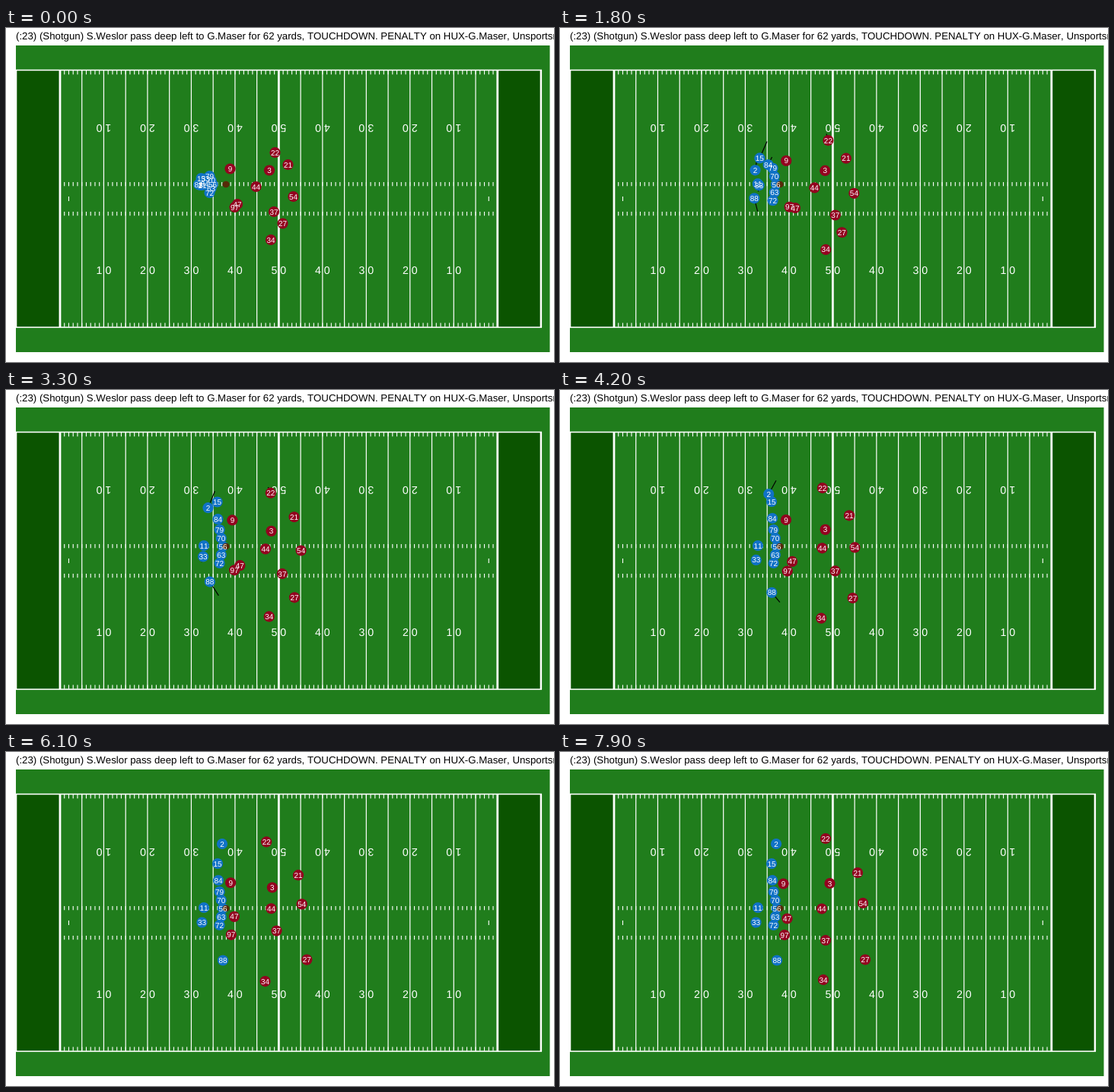
An HTML page that plays this animation: 720 px wide and 440 px high, repeating every 8 s.

```html
<!DOCTYPE html>
<html lang="en">
<head>
<meta charset="utf-8">
<title>Play tracking</title>
<style>
  html, body { margin: 0; width: 720px; height: 440px; overflow: hidden; background: #fff; }
  svg { display: block; }
  text {
    font-family: "Liberation Sans", Arial, sans-serif;
    font-kerning: none;
    text-rendering: geometricPrecision;
    white-space: pre;
  }
  .mid { fill: #fff; text-anchor: middle; }
</style>
</head>
<body>
<svg id="stage" width="720" height="440" viewBox="0 0 720 440"></svg>
<script>
const stage = document.getElementById("stage");
const GRASS = "#207d1c", ENDZONE = "#0b5400", BLUE = "#1072c6", RED = "#93001f";
const TOP = 55.5, BOTTOM = 394.3, YARD = 5.748;
const STEP = 100, STEPS = 80;
const BALL = { x: 289, y: 206 };

function add(parent, tag, attrs, text) {
  const el = document.createElementNS("http://www.w3.org/2000/svg", tag);
  set(el, attrs);
  if (text !== undefined) el.textContent = text;
  return parent.appendChild(el);
}

function set(el, attrs) {
  for (const name in attrs) el.setAttribute(name, attrs[name]);
}

const yardX = yard => 13.5 + YARD * yard;

function vertical(x, y1, y2, width) {
  add(stage, "line", { x1: x, x2: x, y1, y2, stroke: "#fff", "stroke-width": width });
}

function drawField() {
  add(stage, "rect", { x: 13, y: 23, width: 701.5, height: 404, fill: GRASS });
  for (const yard of [0, 110]) {
    add(stage, "rect", {
      x: yardX(yard), y: TOP, width: 10 * YARD, height: BOTTOM - TOP, fill: ENDZONE
    });
  }
  for (let yard = 15; yard < 110; yard += 5) vertical(yardX(yard), TOP, BOTTOM, 1.2);
  for (const yard of [10, 60, 110]) vertical(yardX(yard), TOP, BOTTOM, 2.8);
  for (let yard = 11; yard < 110; yard++) {
    for (const y of [56, 203, 242, 388.5]) vertical(yardX(yard), y, y + 5.3, 1.1);
  }
  for (const yard of [12, 108]) vertical(yardX(yard), 222, 228, 1.1);
  add(stage, "rect", {
    x: 13.5, y: TOP, width: 120 * YARD, height: BOTTOM - TOP,
    fill: "none", stroke: "#fff", "stroke-width": 1.6
  });
  vertical(yardX(120) - 0.4, TOP, BOTTOM, 2.4);
  for (let yard = 20; yard <= 100; yard += 10) {
    const label = (50 - Math.abs(60 - yard)) / 10 + " 0";
    const attrs = { class: "mid", y: 5.1, "font-size": 14.2 };
    const at = `translate(${yardX(yard)} `;
    add(stage, "text", { ...attrs, transform: at + "318.8)" }, label);
    add(stage, "text", { ...attrs, transform: at + "131.8) rotate(180)" }, label);
  }
  add(stage, "text", { x: 13, y: 15, "font-size": 13.25, fill: "#000" },
    "(:23) (Shotgun) S.Weslor pass deep left to G.Maser for 62 yards, TOUCHDOWN. " +
    "PENALTY on HUX-G.Maser, Unsportsmanlike Conduct");
}

const clamp = u => Math.max(0, Math.min(1, u));
const mix = (a, b, u) => a + (b - a) * u;
const smooth = u => u * u * (3 - 2 * u);
const easeOut = u => u * (2 - u);

// Trots to a spot and stops there.
const settle = (from, to, steps) => step => {
  const u = easeOut(clamp(step / steps));
  return [mix(from[0], to[0], u), mix(from[1], to[1], u)];
};

// Runs wide first, then drifts up to the line of scrimmage.
const swing = (from, to, steps) => step => {
  const u = smooth(clamp(step / steps));
  return [mix(from[0], to[0], u * u), mix(from[1], to[1], u)];
};

// Cubic through four evenly spaced points, by forward differences.
function roam(...points) {
  const through = (axis, s) => {
    const [a, b, c, d] = points.map(p => p[axis]);
    return a + s * (b - a)
      + s * (s - 1) / 2 * (c - 2 * b + a)
      + s * (s - 1) * (s - 2) / 6 * (d - 3 * c + 3 * b - a);
  };
  return step => {
    const s = 3 * clamp(step / (STEPS - 1));
    return [through(0, s), through(1, s)];
  };
}

drawField();
const arrows = add(stage, "g", { stroke: "#000", "stroke-width": 1.2 });
const dots = add(stage, "g", {});
add(stage, "ellipse", { cx: BALL.x, cy: BALL.y, rx: 4.7, ry: 4.3, fill: "#572a08" });
const labels = add(stage, "g", { class: "mid", "font-size": 9.96 });
const players = [];

function player(color, number, path) {
  players.push({
    path,
    arrow: add(arrows, "line", {}),
    dot: add(dots, "circle", { r: 7.1, fill: color }),
    label: add(labels, "text", {}, number)
  });
}

const offense = (number, path) => player(BLUE, number, path);
const defense = (number, ...points) => player(RED, number, roam(...points));

offense(2, swing([255, 207], [284, 121], 58));
offense(11, settle([258, 207], [260, 205], 25));
offense(15, swing([256.5, 198], [278, 147], 35));
offense(33, swing([262, 198.5], [257.5, 224.5], 46));
offense(84, settle([261, 205.5], [279, 169], 40));
offense(88, swing([253, 206], [285, 274.5], 53));

// The line spreads from a tight wedge to twice its spacing around the ball.
[79, 70, 56, 63, 72].forEach((number, i) => {
  const side = i - 2, depth = Math.abs(side);
  offense(number, settle(
    [BALL.x - 17.5 - 2 * depth, BALL.y + 5.5 * side],
    [BALL.x - 4 - 2.2 * depth, BALL.y + 11 * side], 25));
});

defense(3, [346, 187.5], [348.5, 187], [349, 181], [354.5, 173]);
defense(9, [294.5, 185.5], [297.5, 172.5], [296, 171.5], [293.5, 173.5]);
defense(21, [370.5, 180], [377.5, 169], [382, 163.5], [391, 159]);
defense(22, [353.5, 164], [350, 141], [342.5, 122.5], [349, 114]);
defense(27, [363.5, 257.5], [375, 272], [391, 274], [401, 273.5]);
defense(34, [348, 279], [347.5, 296], [341, 302], [346, 300]);
defense(37, [352, 242], [363, 244.5], [358.5, 235.5], [349, 248]);
defense(44, [328.5, 209], [338, 210], [347.5, 207], [344, 206.5]);
defense(97, [300.5, 236], [301, 236.5], [297, 240], [295, 241]);
defense(47, [304, 232], [308.5, 234.5], [302, 220], [298.5, 219.5]);
defense(54, [377.5, 222], [387.5, 214.5], [387.5, 203], [398, 199]);

// Each arrow spans the distance covered in ten steps at the current speed.
function render(step) {
  for (const { path, arrow, dot, label } of players) {
    const [x, y] = path(step);
    const [x0, y0] = path(step - 0.5);
    const [x1, y1] = path(step + 0.5);
    set(arrow, { x1: x, y1: y, x2: x + 10 * (x1 - x0), y2: y + 10 * (y1 - y0) });
    set(dot, { cx: x, cy: y });
    set(label, { x, y: y + 3.5 });
  }
}

const start = performance.now();
function tick() {
  const elapsed = Math.max(0, performance.now() - start);
  render(Math.floor(elapsed / STEP) % STEPS);
  requestAnimationFrame(tick);
}
render(0);
requestAnimationFrame(tick);
</script>
</body>
</html>
```
